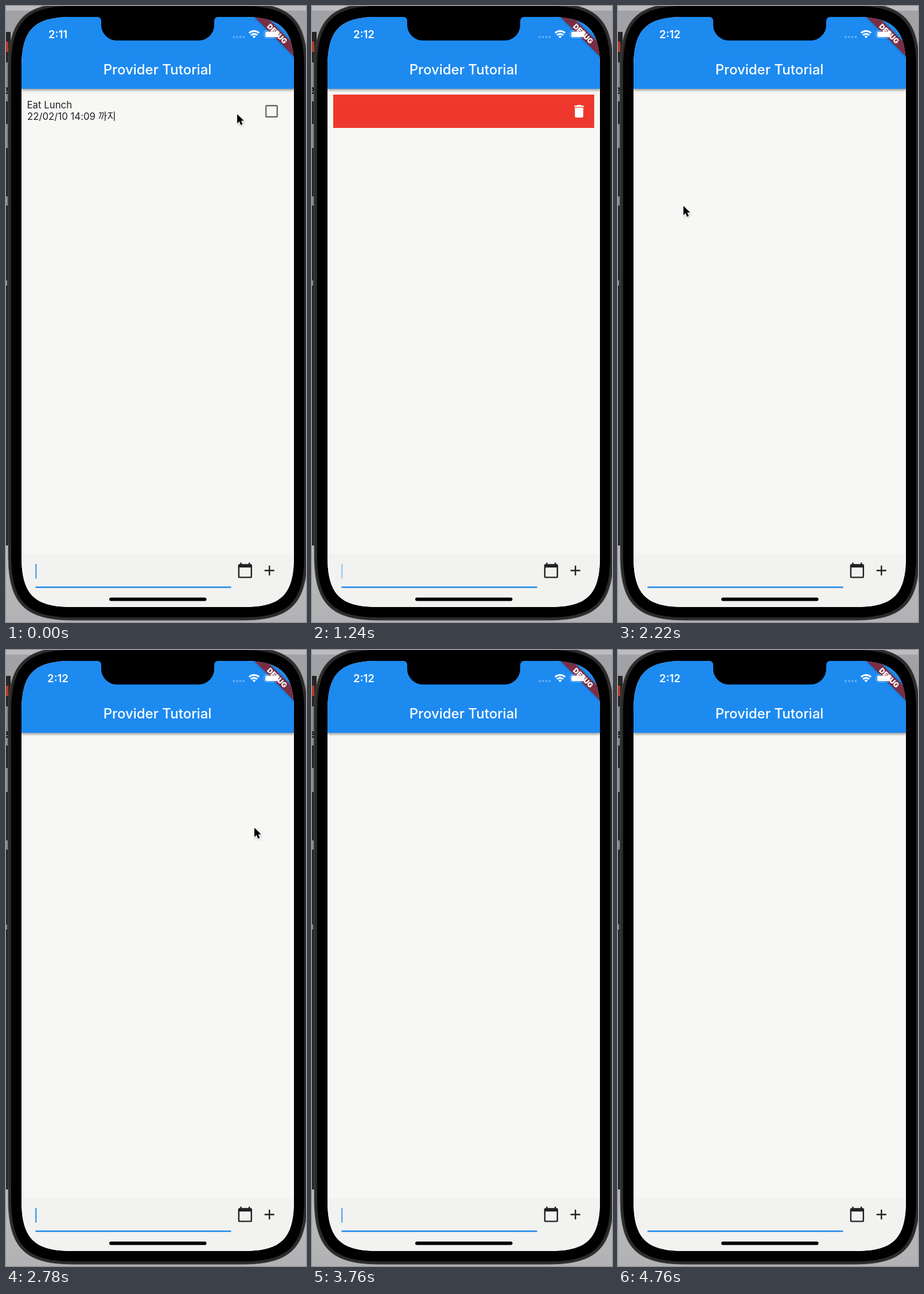
An HTML page that plays this animation: 523x1071 px, repeating every 4780 ms.

```html
<!DOCTYPE html>
<html lang="en">
<head>
<meta charset="utf-8">
<style>
  html, body { margin: 0; width: 100%; height: 100%; overflow: hidden; background: #222; }
  svg { display: block; width: 523px; height: 1071px; }
  text { font-family: Inter, "Noto Sans CJK KR", "Noto Sans CJK", sans-serif; }
</style>
</head>
<body>
<svg viewBox="0 0 523 1071">
  <defs>
    <clipPath id="screen"><path id="display"/></clipPath>
    <clipPath id="exposed"><rect id="exposedBox" x="492" y="154" width="0" height="58"/></clipPath>
    <filter id="blur" x="-20%" y="-200%" width="140%" height="500%"><feGaussianBlur stdDeviation="2.2"/></filter>
    <linearGradient id="floor" x2="0" y2="1">
      <stop stop-color="#bcbbbd"/><stop offset="1" stop-color="#b2b1b4"/>
    </linearGradient>
  </defs>

  <!-- desktop behind the phone -->
  <rect width="523" height="1071" fill="#a2a1a5"/>
  <rect width="523" height="8" fill="#bdbcc0"/>
  <rect y="45" width="8" height="893" fill="#262626"/>
  <rect y="62" width="4" height="18" fill="#b53a24"/>
  <g fill="#8b8b8b">
    <rect y="98" width="3" height="68"/>
    <rect y="205" width="3" height="42"/>
    <rect y="331" width="3" height="16"/>
    <rect y="477" width="2" height="9"/>
  </g>
  <text x="-7" y="153" font-size="21" font-weight="700" fill="#111">e</text>
  <rect y="938" width="523" height="133" fill="url(#floor)"/>

  <!-- phone body -->
  <path id="rim" fill="#2b2b2c" stroke="#4b4b4d"/>
  <path id="bezel"/>

  <g clip-path="url(#screen)">
    <rect x="27" y="19" width="475" height="1026" fill="#f7f7f5"/>
    <rect x="27" y="952" width="475" height="93" fill="#f2f2f0"/>

    <!-- list item with swipe background -->
    <g clip-path="url(#exposed)">
      <rect x="37" y="154" width="455" height="58" fill="#ef382d"/>
      <path id="trash" transform="translate(451 168.3) scale(1.218)" fill="#fff"
        d="M6 19c0 1.1.9 2 2 2h8c1.1 0 2-.9 2-2V7H6v12zM19 4h-3.5l-1-1h-5l-1 1H5v2h14V4z"/>
    </g>
    <g id="row" font-size="16.8" fill="#222">
      <text x="36.5" y="178">Eat Lunch</text>
      <text x="37" y="198">22/02/10 14:09 까지</text>
      <rect x="453.2" y="173.2" width="19.6" height="19.6" rx="1" fill="none" stroke="#6c6c67" stroke-width="2.4"/>
    </g>

    <!-- app bar -->
    <rect x="27" y="125" width="475" height="21.5" opacity=".38" filter="url(#blur)"/>
    <rect x="27" y="19" width="475" height="125" fill="#1d8af0"/>
    <text x="264" y="118.5" font-size="24" font-weight="500" fill="#fff" text-anchor="middle">Provider Tutorial</text>

    <!-- debug ribbon -->
    <g transform="translate(502 19) rotate(45)">
      <rect x="-60" y="34" width="120" height="14.6" opacity=".3" filter="url(#blur)"/>
      <rect x="-60" y="34" width="120" height="14.6" fill="#7b2d42"/>
      <text y="45.8" font-size="12.4" font-weight="900" fill="#fff" text-anchor="middle">DEBUG</text>
    </g>

    <!-- status bar -->
    <text id="clock" x="90.5" y="56" font-size="18.5" font-weight="600" fill="#fff" text-anchor="middle"></text>
    <path d="M397 54h20" stroke="#fff" stroke-width="4" stroke-linecap="round" stroke-dasharray="0 5.8" opacity=".3"/>
    <g fill="none" stroke="#fff" stroke-width="3">
      <path d="M423.8 47a12.5 12.5 0 0 1 17.4 0M427 50.6a8 8 0 0 1 11 0"/>
      <path d="M429.6 53l2.9 3 2.9-3a4.2 4.2 0 0 0-5.8 0z" fill="#fff" stroke="none"/>
    </g>
    <rect x="450" y="42.5" width="27" height="13" rx="4" fill="none" stroke="#fff" opacity=".45"/>
    <rect x="452" y="44.5" width="23" height="9.500" rx="2.5" fill="#fff"/>
    <path d="M478.5 47v4.5a2.5 2.5 0 0 0 0-4.5z" fill="#fff" opacity=".5"/>

    <!-- input bar -->
    <rect x="51.5" y="1009.3" width="341" height="2.5" fill="#1e88ec"/>
    <rect id="caret" x="51" y="970" width="2.4" height="25.5" fill="#2090f0"/>
    <g fill="#212121">
      <path transform="translate(402.2 966.6) scale(1.218)"
        d="M20 3h-1V1h-2v2H7V1H5v2H4c-1.1 0-2 .9-2 2v16c0 1.1.9 2 2 2h16c1.1 0 2-.9 2-2V5c0-1.1-.9-2-2-2zm0 18H4V8h16v13z"/>
      <path transform="translate(444.6 966.9) scale(1.218)" d="M19 13h-6v6h-2v-6H5v-2h6V5h2v6h6v2z"/>
    </g>
    <rect x="180" y="1028.5" width="169.5" height="6" rx="3"/>
  </g>

  <!-- notch -->
  <path d="M159 18v1q7 0 7 8v6a27 27 0 0 0 27 27h143a27 27 0 0 0 27-27v-6q0-8 7-8v-1z"/>

  <g id="pointer" stroke-linejoin="round">
    <path d="M1 3v19l4-4 3 6 4-1.5-3-6.5h6z" opacity=".3" filter="url(#blur)"/>
    <path d="M0 0v18.5l4.2-4 3.1 7.2 3.5-1.5-3-7h5.700z" stroke="#fff" stroke-width="2.4" paint-order="stroke"/>
  </g>
</svg>

<script>
const LOOP = 4780;
const [display, rim, bezel, row, exposedBox, trash, clock, caret, pointer] =
  ['display', 'rim', 'bezel', 'row', 'exposedBox', 'trash', 'clock', 'caret', 'pointer']
    .map(id => document.getElementById(id));

const clamp = x => Math.max(0, Math.min(1, x));
const easeOut = x => 1 - (1 - clamp(x)) ** 1.6;
const smooth = x => (x = clamp(x), x * x * (3 - 2 * x));

// Rectangle whose corners bend over length c with continuous curvature.
function squircle(l, t, r, b, c) {
  const k = c * 0.25;
  return `M${l + c} ${t}H${r - c}C${r - k} ${t} ${r} ${t + k} ${r} ${t + c}` +
    `V${b - c}C${r} ${b - k} ${r - k} ${b} ${r - c} ${b}` +
    `H${l + c}C${l + k} ${b} ${l} ${b - k} ${l} ${b - c}` +
    `V${t + c}C${l} ${t + k} ${l + k} ${t} ${l + c} ${t}z`;
}
display.setAttribute('d', squircle(27, 19, 502, 1045, 88));
bezel.setAttribute('d', squircle(9, 0, 520, 1063, 108));
rim.setAttribute('d', squircle(4, -5, 525, 1068, 114));

// Linear interpolation through [step, ...values] keys.
function along(keys, step) {
  if (step <= keys[0][0]) return keys[0].slice(1);
  const i = keys.findIndex(k => k[0] >= step);
  if (i < 0) return keys[keys.length - 1].slice(1);
  const a = keys[i - 1], b = keys[i], p = (step - a[0]) / (b[0] - a[0]);
  return a.slice(1).map((v, j) => v + (b[j + 1] - v) * p);
}

const SWIPE = [[0, 0], [2, 70], [7, 375], [10, 455]];
const POINTER = [[0, 403, 188], [2, 316, 189], [6, -20, 192], [36, -20, 354],
  [42, 31, 354], [47, 114, 347.5], [53, 286, 332], [59, 433, 309], [64, 560, 285]];

// The screen advances three uneven steps every 140 ms.
function stepAt(t) {
  const r = t % 140;
  return 3 * Math.floor(t / 140) + (r < 20 ? 0 : r < 120 ? 1 : 2);
}

// Blink: each half period starts with a quick fade.
function caretOpacity(step) {
  const half = 28.75, phase = (step - 20 + 2 * half) % (2 * half);
  const fade = easeOut((phase % half) / 14);
  return phase < half ? 1 - fade : fade;
}

function draw(step) {
  const [dx] = along(SWIPE, step);
  const height = 58 * (1 - smooth((step - 27) / 10));
  row.setAttribute('transform', `translate(${-dx} 0)`);
  row.setAttribute('visibility', dx < 455 ? 'visible' : 'hidden');
  exposedBox.setAttribute('x', 492 - dx);
  exposedBox.setAttribute('width', dx);
  exposedBox.setAttribute('height', height);
  trash.setAttribute('transform', `translate(451 ${168.3 - (58 - height) / 2}) scale(1.218)`);

  clock.textContent = step < 3 ? '2:11' : '2:12';
  caret.setAttribute('opacity', caretOpacity(step));
  pointer.setAttribute('transform', `translate(${along(POINTER, step)}) scale(.88)`);
}

function tick() {
  draw(stepAt(performance.now() % LOOP));
  requestAnimationFrame(tick);
}
tick();
</script>
</body>
</html>
```
